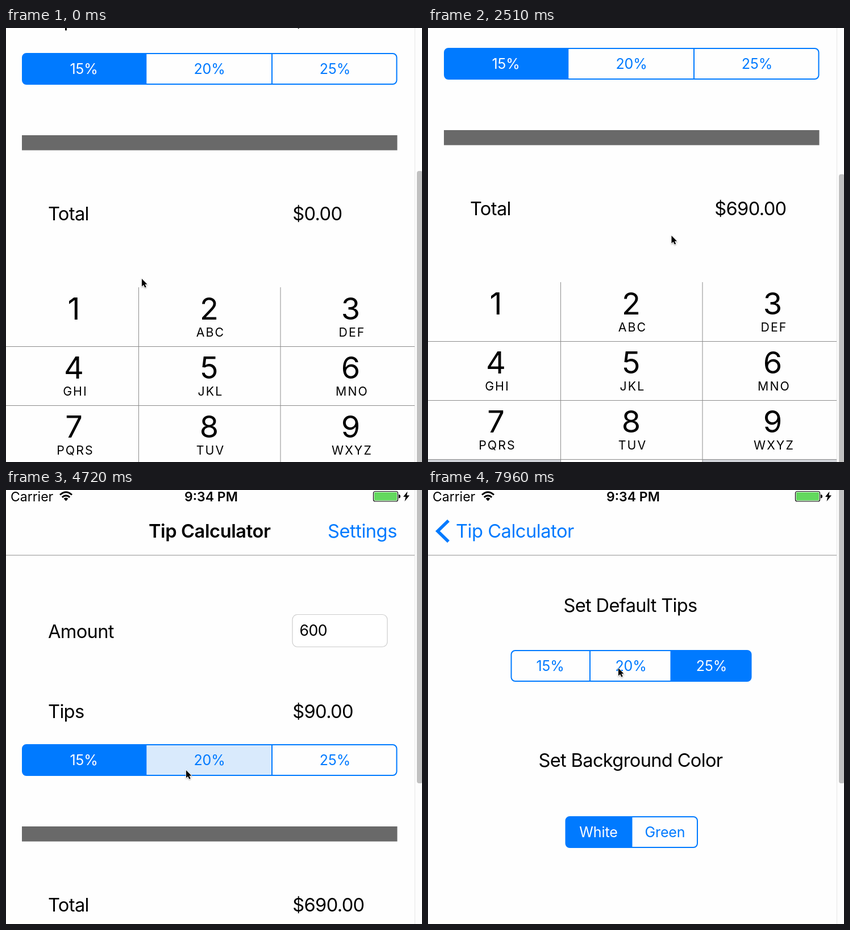
An HTML page that plays this animation: 732x765 px, repeating every 8 s.

```html
<!DOCTYPE html>
<html lang="en">
<head>
<meta charset="utf-8">
<title>Tip calculator</title>
<style>
  html, body { margin: 0; width: 100%; height: 100%; overflow: hidden; background: #fefefe; }
  svg { display: block; width: 732px; height: 765px; font-family: Inter, Roboto, sans-serif; }
  text { white-space: pre; }
  .label { font-size: 32.6px; letter-spacing: -.02em; }
  .title { font-size: 32.6px; letter-spacing: -.012em; font-weight: 600; }
  .small { font-size: 25px; letter-spacing: -.005em; text-anchor: middle; }
  .field { font-size: 26.6px; letter-spacing: -.02em; }
  .status { font-size: 23px; }
  .digit { font-size: 54px; text-anchor: middle; }
  .letters { font-size: 21.3px; letter-spacing: 2.1px; text-anchor: middle; }
  .blue { fill: #007aff; letter-spacing: -.014em; }
  .line { fill: none; stroke: #007aff; stroke-width: 2; }
  .rule { stroke: #8c8c8c; stroke-width: 1; }
</style>
</head>
<body>
<svg viewBox="0 0 732 765">
  <defs>
    <clipPath id="body"><rect y="116" width="720" height="1300"/></clipPath>
    <filter id="shade" x="-50%" y="-50%" width="200%" height="200%">
      <feDropShadow dx="0" dy="1" stdDeviation="1" flood-opacity=".4"/>
    </filter>
  </defs>
  <rect width="732" height="765" fill="#fefefe"/>
  <g id="page">
    <g clip-path="url(#body)">
      <g id="main">
        <text class="label" x="74" y="260.5">Amount</text>
        <rect x="504" y="219.5" width="167" height="57" rx="9" fill="#fff" stroke="#ccc" stroke-width="1.2"/>
        <text class="field" id="amount" x="516.5" y="257"></text>
        <rect id="caret" x="565.5" y="229" width="3.6" height="35" rx="1" fill="#426bf2"/>
        <text class="label" x="74" y="401.5">Tips</text>
        <text class="label" id="tip" x="504.3" y="401.5"></text>
        <g id="rates"></g>
        <rect x="28" y="593" width="660.5" height="26.5" fill="#696969"/>
        <text class="label" x="74" y="742.5">Total</text>
        <text class="label" id="total" x="504.3" y="742.5"></text>
        <g id="keypad"></g>
      </g>
      <g id="settings">
        <rect y="116" width="720" height="1300" fill="#fefefe"/>
        <text class="label" x="238.5" y="215">Set Default Tips</text>
        <g id="defaults"></g>
        <text class="label" x="194.5" y="488">Set Background Color</text>
        <g id="colors"></g>
      </g>
    </g>
    <path d="M0 115H720" stroke="#b2b2b2" stroke-width="1.5"/>
    <text class="status" x="8" y="20">Carrier</text>
    <g fill="none" stroke="#000" stroke-width="3">
      <path d="M95 8.5Q105.5 -1 116 8.5M98.8 12.8Q105.5 7 112.2 12.8"/>
      <path d="M101.5 15Q105.5 11.8 109.5 15L105.5 19.5Z" fill="#000" stroke="none"/>
    </g>
    <text class="status" x="361" y="20" font-weight="600" text-anchor="middle">9:34 PM</text>
    <rect x="646.5" y="2.5" width="43" height="17.5" rx="3" fill="#fff" stroke="#000" stroke-width="1.2"/>
    <rect x="648" y="4" width="40" height="14.5" rx="1.5" fill="#63d85e"/>
    <path d="M691 8q3 0 3 3.2t-3 3.2z"/>
    <path d="M706.5 2.5L699 12h4.3l-1.8 8 8.5-10.5h-4.7z"/>
    <text class="title" id="title" y="84">Tip Calculator</text>
    <text class="label blue" id="open" x="566" y="84">Settings</text>
    <text class="label blue" id="back" y="84">Tip Calculator</text>
    <path id="chevron" d="M36 54L17 72.5L36 91" fill="none" stroke="#007aff" stroke-width="5.5"/>
  </g>
  <rect x="720" width="12" height="765" fill="#fdfdfd"/>
  <path d="M719.5 0V765" stroke="#e6e6e6"/>
  <rect id="thumb" x="723" width="10" height="523" rx="4" fill="#c1c1c1"/>
  <path id="cursor" d="M0 0V13.5L3.1 10.7L5.4 15.6L7.7 14.5L5.4 9.8H9.5Z"
        stroke="#fff" stroke-width="1.4" paint-order="stroke" filter="url(#shade)"/>
</svg>
<script>
const $ = id => document.getElementById(id);
const KEY_GREY = '#d1d4da';

const LOOP = 8000, TICK = 147.4, LEAD = 7;

const cursorPath = [
  [0, 239, 442], [4, 606, 606], [8, 606, 606], [10, 419, 731], [13, 419, 731],
  [16, 428.5, 372], [17, 428.5, 366], [22, 451, 373], [24, 451, 373], [30, 317, 494],
  [34, 317, 494], [38, 560, 488], [41, 560, 488], [44, 660, 70], [49, 660, 70], [54, 335, 314]
];
const scrollPath = [[0, 404], [6, 404], [8, 462], [16, 462], [17, 413], [20, 175], [22, 53], [23, 16], [24, 0]];
const pushPath = [[47, 0], [48, .35], [49, .88], [50, 1]];

const linear = u => u;
const smooth = u => u * u * (3 - 2 * u);

function sample(path, tick, ease = linear) {
  const next = path.findIndex(key => key[0] > tick);
  if (next < 0) return path[path.length - 1].slice(1);
  if (next === 0) return path[0].slice(1);
  const a = path[next - 1], b = path[next];
  const u = ease((tick - a[0]) / (b[0] - a[0]));
  return a.slice(1).map((v, i) => v + (b[i + 1] - v) * u);
}

// Builds a segmented control and returns its (selected, pressed) setter.
function segmented(id, top, edges, labels, centers) {
  const left = edges[0], width = edges[edges.length - 1] - left;
  const frame = `x="${left + 1}" y="${top + 1}" width="${width - 2}" height="54" rx="7"`;
  $(id).innerHTML =
    `<clipPath id="${id}-clip"><rect ${frame}/></clipPath><g clip-path="url(#${id}-clip)">` +
    labels.map((_, i) => `<rect class="cell" x="${edges[i]}" y="${top}" width="${edges[i + 1] - edges[i]}" height="56"/>`).join('') +
    `</g><rect class="line" ${frame}/>` +
    edges.slice(1, -1).map(x => `<path class="line" d="M${x} ${top}v56"/>`).join('') +
    labels.map((s, i) => `<text class="small" x="${centers[i]}" y="${top + 37}">${s}</text>`).join('');
  const cells = $(id).querySelectorAll('.cell'), texts = $(id).querySelectorAll('text');
  return (selected, pressed = -1) => cells.forEach((cell, i) => {
    cell.setAttribute('fill', i === selected ? '#007aff' : i === pressed ? '#d9eafc' : '#fefefe');
    texts[i].setAttribute('fill', i === selected ? '#fff' : '#007aff');
  });
}

function buildKeypad() {
  const top = 861, row = 104, edges = [0, 233.5, 483, 720];
  const letters = ['', 'ABC', 'DEF', 'GHI', 'JKL', 'MNO', 'PQRS', 'TUV', 'WXYZ'];
  const keyRect = (n, col, y) =>
    `<rect id="key${n}" x="${edges[col]}" y="${y}" width="${edges[col + 1] - edges[col]}" height="${row}"/>`;
  let cells = `<rect y="${top + 3 * row}" width="720" height="${row}" fill="${KEY_GREY}"/>` + keyRect(0, 1, top + 3 * row);
  let glyphs = `<text class="digit" x="358" y="1245">0</text>`;
  letters.forEach((word, i) => {
    const col = i % 3, y = top + Math.floor(i / 3) * row;
    cells += keyRect(i + 1, col, y);
    glyphs += `<text class="digit" x="${[119.5, 357.5, 606.5][col]}" y="${y + 56.5}">${i + 1}</text>` +
      `<text class="letters" x="${[122, 360, 609][col]}" y="${y + 86.5}">${word}</text>`;
  });
  const rules = [1, 2, 3].map(i => `<path class="rule" d="M0 ${top + i * row + .5}H720"/>`).join('') +
    `<path class="rule" d="M233.5 ${top}v416M483 ${top}v416"/>`;
  const erase = `<path d="M579 1226.5L592 1212.5Q595 1210 598 1210H617Q621.5 1210 621.5 1214.5V1238.5Q621.5 1243 617 1243H598Q595 1243 592 1240.5Z
    M598 1218.5l14 14m0-14l-14 14" fill="none" stroke="#000" stroke-width="3" stroke-linejoin="round"/>`;
  $('keypad').innerHTML = cells + rules + glyphs + erase;
}

const dollars = value => '$' + value.toFixed(2);
const shift = (id, x, y) => $(id).setAttribute('transform', `translate(${x} ${y})`);
const fade = (id, opacity) => $(id).setAttribute('opacity', opacity);
const between = (tick, a, b) => tick >= a && tick <= b;

buildKeypad();
const thirds = ['15%', '20%', '25%'];
const setRate = segmented('rates', 448, [28, 246.3, 468, 688.5], thirds, [137, 358, 579]);
segmented('defaults', 282, [145.5, 285, 427.5, 569.5], thirds, [215, 357, 499])(2);
segmented('colors', 575, [241.5, 358.5, 475], ['White', 'Green'], [300, 417])(0);

function render(ms) {
  const tick = Math.floor((ms + LEAD) / TICK);

  const [scroll] = sample(scrollPath, tick);
  shift('page', 0, -scroll);
  $('thumb').setAttribute('y', -6 + scroll * .6386);
  shift('cursor', ...sample(cursorPath, tick, smooth));

  const amount = tick < 6 ? 0 : tick < 11 ? 6 : tick < 13 ? 60 : 600;
  const choice = tick < 33 ? 0 : tick < 41 ? 1 : 2;
  const tip = amount * [.15, .2, .25][choice];
  $('amount').textContent = amount || '';
  $('tip').textContent = dollars(tip);
  $('total').textContent = dollars(amount + tip);
  setRate(choice, between(tick, 31, 32) ? 1 : tick === 40 ? 2 : -1);
  fade('caret', (tick * TICK + LEAD) % 1000 < 550 ? 1 : 0);

  const pressed = tick === 5 ? 6 : tick === 10 || tick === 12 ? 0 : -1;
  for (let n = 0; n < 10; n++) $('key' + n).setAttribute('fill', n === pressed ? KEY_GREY : '#fefefe');

  const [push] = sample(pushPath, tick);
  shift('main', -216 * push, 0);
  shift('settings', 720 * (1 - push), 0);
  const titleX = 251 - 202 * push;
  $('title').setAttribute('x', titleX);
  $('back').setAttribute('x', titleX);
  fade('title', 1 - push);
  fade('back', push);
  fade('chevron', push);
  fade('open', (1 - push) * (tick === 47 ? .3 : 1));
}

function loop() {
  render(performance.now() % LOOP);
  requestAnimationFrame(loop);
}
loop();
</script>
</body>
</html>
```
